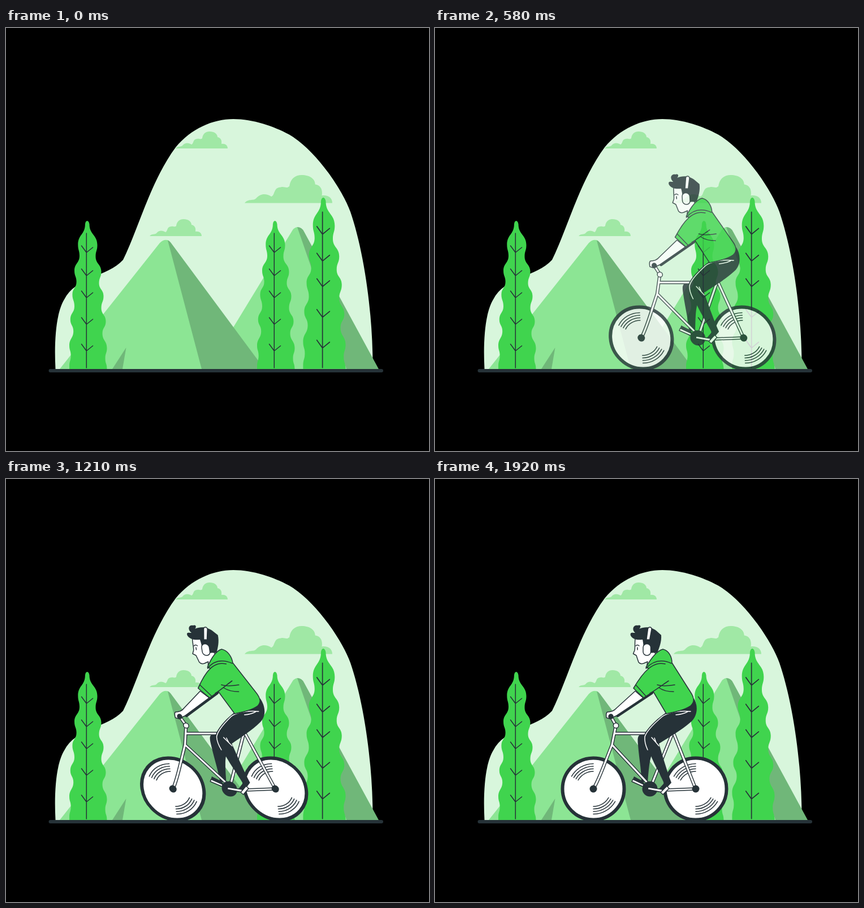
An HTML page for the animation above (1960 ms loop, 748 by 748 pixels).

```html
<!DOCTYPE html>
<html>
<head>
<meta charset="utf-8">
<style>
  html, body { margin: 0; width: 100%; height: 100%; overflow: hidden; background: #000; }
  svg { display: block; width: 100vw; height: 100vh; }
  .dark { fill: #263238; }
  .green { fill: #40d44e; }
  .white { fill: #fff; }
  .hill { fill: #8ce594; }
  .shade { fill: #70b779; }
  .ink { stroke: #263238; stroke-width: 1.5; stroke-linecap: round; stroke-linejoin: round; }
  .line { fill: none; }
  .tube path { fill: none; stroke: #263238; stroke-width: 6; stroke-linejoin: round; }
  .tube path + path { stroke: #fff; stroke-width: 3.2; }
</style>
</head>
<body>
<svg viewBox="0 0 748 748">
  <defs>
    <path id="cloud" fill="#a0e8a5" d="M0 0C4-5 9-2 12-5C17-11 23-10 28-7C32-8 30-17 38-17C42-18 44-15 47-18C48-26 53-30 60-30C68-30 74-26 74-20C80-19 82-14 81-8C87-9 92-6 92 0Z"/>
    <g id="tree">
      <path id="leaves" class="green"/>
      <path id="twigs" class="ink line"/>
    </g>
    <g id="wheel">
      <circle r="54.5" fill="#fff" stroke="#263238" stroke-width="6"/>
      <path id="grooves" class="ink line"/>
    </g>
  </defs>

  <path fill="#d8f6dc" d="M87.500 603C85 555 88 505 103 480C123 440 180 440 207 410C233 358 256 270 300 211C327 178 366 161 402 161C437 161 474 174 500 188C548 215 596 288 609 325C632 392 649 500 648.500 603Z"/>
  <use href="#cloud" x="300" y="213"/>
  <use href="#cloud" x="254" y="368"/>
  <use href="#cloud" transform="translate(422 309.500) scale(1.685 1.65)"/>

  <path class="hill" d="M357 603L507 357Q511 352 516 352L602 603Z"/>
  <path class="shade" d="M515 352Q523 352 527 360L659 603H602Z"/>
  <path class="hill" d="M95 603L272 380Q280 372 288 376L347 603Z"/>
  <path class="shade" d="M286 375.500Q289 376 291 379L457 603H346Z"/>
  <path class="shade" d="M188 603L212.500 565L206 603Z"/>

  <use href="#tree" transform="translate(143.500 341)"/>
  <use href="#tree" transform="translate(475.500 341)"/>
  <use href="#tree" transform="translate(561 300) scale(1.13 1.156)"/>
  <path d="M78.500 606H664" stroke="#263238" stroke-width="6" stroke-linecap="round"/>

  <g id="rider" opacity="0">
    <use href="#wheel" x="280" y="548"/>
    <use href="#wheel" x="461" y="548"/>

    <!-- far leg, pedal and arm -->
    <path class="dark" d="M365 452C358 452 358 460 359 470C361 495 365 515 365 535L376 537C378 510 380 492 385 485L378 452Z"/>
    <path class="dark" d="M352 526L367 534L374 543L365 544L349 533Z"/>
    <path class="white ink" d="M350 531L369 540L368 544L348 535Z"/>
    <path class="ink line" style="stroke-width:6" d="M383 378L323 418"/>

    <g class="tube">
      <path d="M280 548C291 530 297 510 313 470L319 440M317 450H376M313 470L380 542M380 548L421 447L461 548"/>
      <path d="M280 548C291 530 297 510 313 470L319 440M317 450H376M313 470L380 542M380 548L421 447L461 548"/>
    </g>
    <path class="white ink" d="M382 549L461 546V550L382 553Z"/>
    <circle class="dark" cx="280" cy="548" r="6.500"/>
    <circle class="dark" cx="461" cy="548" r="6.500"/>
    <circle class="dark" cx="380" cy="548" r="13.500"/>

    <!-- near leg -->
    <path class="dark" d="M410 412C395 422 380 436 372 448C366 457 372 468 377 477C385 500 397 520 405 538L396 548L402 555L418 537C408 510 402 488 396 468C412 458 436 444 452 430C464 420 466 402 458 388Z"/>
    <path class="line" stroke="#fff" stroke-width="1.500" stroke-linecap="round" d="M452 411C430 409 412 413 402 420C388 432 374 445 371 456Q370 466 376 479M383 457L396 472M388 458L391 466M426 417Q438 416 446 412"/>
    <path class="white ink" d="M377 545L402 549V554L376 549Z"/>
    <path class="white ink" d="M399 554L410 543L414 547L403 558Z"/>

    <!-- handlebar and hand -->
    <g class="tube">
      <path d="M319 434L311 420"/>
      <path d="M319 434L311 420"/>
    </g>
    <circle class="white ink" cx="320" cy="436" r="4.600"/>
    <path class="white ink" d="M354 375L321 405Q315 412 305 412Q302 413 303 422L309 424L320 419L368 387Z"/>
    <circle class="dark" cx="311" cy="420" r="4.700"/>

    <!-- head -->
    <path class="white ink" d="M354 282C353 292 354 299 353 303L350.500 309L356 312L360 324Q363 328 369 326L376 323L374 334L392 312L384 300L372 282Z"/>
    <path class="dark" d="M346 277C344 270 350 272 354 272C347 266 351 257 359 259C365 257 364 263 361 265C372 260 384 262 391 268L400 276C401 288 396 300 393 307L372 308C368 300 369 292 367 284C358 285 350 284 346 277Z"/>
    <path class="ink line" d="M355 295Q358 292 361 295M358 298V302M376 292V284"/>
    <path class="white ink" d="M374 283Q374 285 377 284Q380 285 380 282L383 266Q383 262 380 262Q377 262 376.500 265Z"/>
    <rect class="white ink" x="368" y="291.500" width="13.500" height="20.500" rx="6.500"/>

    <!-- hoodie -->
    <path class="green ink" d="M373 333C382 317 392 304 403 301C413 303 419 314 419 325L452 377C458 386 460 394 452 401C440 409 424 412 409 415L386 376L369 387L351 370C358 358 366 345 378 335Z"/>
    <path class="ink line" d="M373 335C385 322 400 318 418 326M378 335C388 327 396 325 407 327M355 364L373 384M380 379C392 372 405 362 413 357M393 364C402 367 412 366 424 364M396 369C404 375 412 376 422 376"/>
  </g>
</svg>
<script>
  const $ = id => document.getElementById(id);

  // Tree outline: half widths at heights below the tip, joined by soft waves.
  // The left side is a little narrower and its waves sit higher.
  const right = [[4, 6], [18, 43], [15, 63], [25, 90], [21, 110], [29, 133], [25, 154],
                 [33, 178], [27, 199], [35, 225], [32, 243], [35, 262]];
  const left = right.map(([w, y]) => [-w * .9, y * .98]).reverse();
  const wave = pts => pts.slice(1).map(([x, y], i) => {
    const [x0, y0] = pts[i], mid = (y + y0) / 2;
    return `C${x0} ${mid} ${x} ${mid} ${x} ${y}`;
  }).join('');
  $('leaves').setAttribute('d',
    `M-3.6 6C-3-2 3-2 4 6${wave(right)}H${left[0][0]}V${left[0][1]}${wave(left)}Z`);
  $('twigs').setAttribute('d', 'M-1.2 22V260' +
    [56, 97, 136, 183, 230].map(y => `M-10 ${y - 12}L-1.2 ${y}L10 ${y - 9}`).join(''));

  // Record grooves in two opposite sectors of the wheel.
  $('grooves').setAttribute('d', [1, -1].map(s => [31, 35.5, 40, 44.5].map(r =>
    `M0 ${-s * r}A${r} ${r} 0 0 0 ${-s * r * 0.866} ${-s * r / 2}`).join('')).join(''));

  const LOOP = 1960, STEP = LOOP / 47, MID_Y = 446;
  const tan = deg => Math.tan(deg * Math.PI / 180);
  const mix = (a, b, p) => a + (b - a) * p;

  // cubic-bezier(.36, -.01, .5, 1.38)
  const bez = (a, b, s) => 3 * (1 - s) * (1 - s) * s * a + 3 * (1 - s) * s * s * b + s * s * s;
  function ease(u) {
    let lo = 0, hi = 1;
    for (let i = 0; i < 25; i++) {
      const s = (lo + hi) / 2;
      if (bez(.36, .5, s) < u) lo = s; else hi = s;
    }
    return bez(-.01, 1.38, lo);
  }

  function draw(t) {
    const ms = Math.min(2000, 28 + 43 * Math.floor(t / STEP + .1));
    let skew, x = 0, alpha = 1;
    if (ms < 1200) {
      const p = ease(ms / 1200);
      skew = mix(tan(-20), tan(10), p);
      x = mix(374, 0, p);
      alpha = Math.max(0, Math.min(1, p));
    } else if (ms < 1600) {
      skew = tan(mix(10, -2, ease((ms - 1200) / 400)));
    } else {
      skew = tan(mix(-2, 0, ease((ms - 1600) / 400)));
    }
    $('rider').setAttribute('transform', `matrix(1 0 ${skew} 1 ${x - skew * MID_Y} 0)`);
    $('rider').setAttribute('opacity', alpha);
  }

  const start = performance.now();
  function tick() {
    draw((performance.now() - start) % LOOP);
    requestAnimationFrame(tick);
  }
  tick();
</script>
</body>
</html>
```
